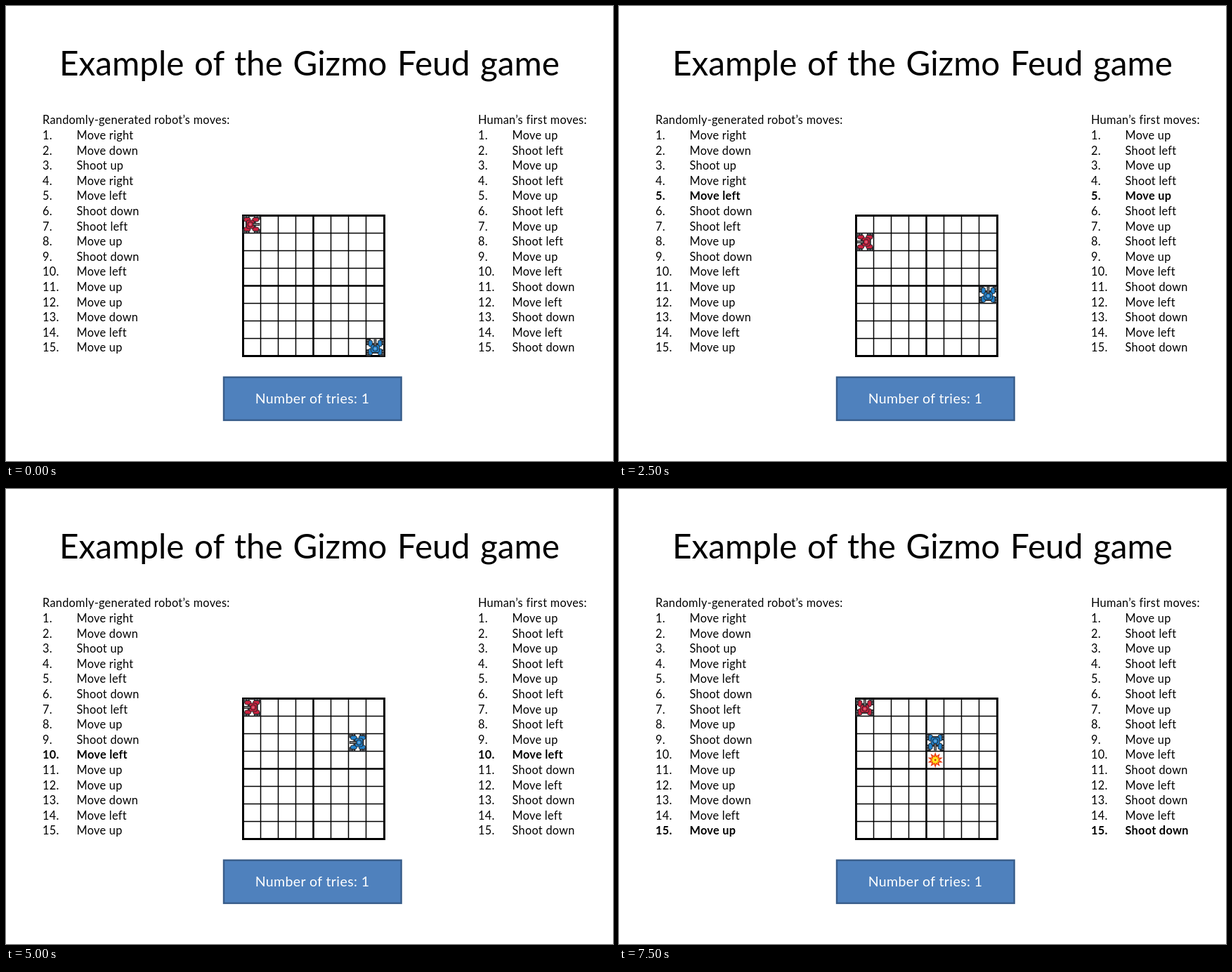
Recreate the animation shown at these times as an HTML page. Size 864x648 px, loop 8 s.

```html
<!DOCTYPE html>
<html lang="en">
<head>
<meta charset="utf-8">
<title>Robot game example</title>
<style>
  html, body { margin: 0; width: 100%; height: 100%; overflow: hidden; background: #fff; }
  svg { display: block; width: 864px; height: 648px; }
  text { font: 16.3px Lato, Carlito, sans-serif; letter-spacing: .3px; white-space: pre; }
  .title { font-size: 47.7px; letter-spacing: 0; word-spacing: 2.4px; text-anchor: middle; }
  .tries { font-size: 19.5px; letter-spacing: .4px; fill: #fff; text-anchor: middle; }
  .now { font-weight: 700; }
</style>
</head>
<body>
<svg id="stage" viewBox="0 0 864 648">
  <defs>
    <!-- Tank seen from above, facing up; body colour is inherited -->
    <g id="tank">
      <path d="M-6-6H6V9H-6Z" fill="#3a3a3e"/>
      <g fill="#2d2f33">
        <rect x="-12.5" y="-12" width="6" height="9"/>
        <rect x="6.5" y="-12" width="6" height="9"/>
        <rect x="-12.5" y="3" width="6" height="10"/>
        <rect x="6.5" y="3" width="6" height="10"/>
      </g>
      <path d="M-12-9.5h4M-12-6h4M-12 6h4M-12 9.5h4M8-9.5h4M8-6h4M8 6h4M8 9.5h4" stroke="#85888c"/>
      <g stroke="#222" stroke-width=".9">
        <rect x="-9.5" y="-10" width="5.5" height="9" rx="2.5"/>
        <rect x="4" y="-10" width="5.5" height="9" rx="2.5"/>
        <rect x="-9.5" y="2" width="5.5" height="9" rx="2"/>
        <rect x="4" y="2" width="5.5" height="9" rx="2"/>
        <rect x="-6" y="-3.5" width="12" height="11" rx="2.5"/>
        <rect x="-1.5" y="-11" width="3" height="9" fill="#777"/>
        <circle cy="2" r="3.8"/>
      </g>
      <circle cy="2" r="1.6" fill="#fff" fill-opacity=".35"/>
    </g>
  </defs>
  <text class="title" x="432" y="99">Example of the Gizmo Feud game</text>
  <rect x="310" y="528.7" width="252.6" height="61.2" fill="#4f81bd" stroke="#385d8a" stroke-width="2.4"/>
  <text class="tries" x="436" y="565.5">Number of tries: 1</text>
</svg>
<script>
const stage = document.getElementById('stage');
const DIRS = { up: [0, -1, 0], right: [1, 0, 90], down: [0, 1, 180], left: [-1, 0, 270] };
const LEFT = 337.25, TOP = 298.5, CELL_W = 25.1, CELL_H = 25;
const STEP = 500, STEPS = 16;

function add(tag, attrs, text = '') {
  const el = document.createElementNS('http://www.w3.org/2000/svg', tag);
  for (const key in attrs) el.setAttribute(key, attrs[key]);
  el.textContent = text;
  stage.append(el);
  return el;
}

const center = (col, row) => `translate(${LEFT + CELL_W * (col + .5)} ${TOP + CELL_H * (row + .5)})`;
const inside = (col, row) => col >= 0 && col < 8 && row >= 0 && row < 8;

// Grid lines sit on pixel centres.
const lineX = i => Math.floor(LEFT + i * CELL_W) + .5;
const lineY = i => Math.floor(TOP + i * CELL_H) + .5;
for (let i = 0; i <= 8; i++) {
  add('path', {
    d: `M${lineX(i)} ${lineY(0) - 1.5}V${lineY(8) + 1.5}M${lineX(0) - 1.5} ${lineY(i)}H${lineX(8) + 1.5}`,
    stroke: '#000',
    'stroke-width': i % 8 == 0 ? 3 : i == 4 ? 2.6 : 1.5
  });
}

function star(points, outer, inner) {
  return Array.from({ length: points * 2 }, (_, i) => {
    const r = i % 2 ? inner : outer, a = i * Math.PI / points;
    return [r * Math.sin(a), -r * Math.cos(a)].map(v => v.toFixed(1));
  }).join(' ');
}

// Replays the move list into one pose per step; `stuck` is a move that has no effect.
function play(moves, col, row, face, stuck) {
  const poses = [{ col, row, face }];
  moves.forEach((move, i) => {
    const [verb, dir] = move.split(' ');
    const [dx, dy] = DIRS[dir];
    const next = [col + dx, row + dy];
    let blast = null;
    if (inside(...next)) {
      if (verb == 'Shoot') blast = next;
      else if (i + 1 != stuck) [col, row] = next;
    }
    poses.push({ col, row, face: dir, blast });
  });
  return poses;
}

function player(x, heading, list, color, col, row, face, stuck) {
  const moves = list.split(',');
  const line = i => 168.4 + 21.6 * i;
  add('text', { x, y: line(0) }, heading);
  const rows = moves.map((move, i) => [
    add('text', { x, y: line(i + 1) }, `${i + 1}.`),
    add('text', { x: x + 48.5, y: line(i + 1) }, move)
  ]);
  const poses = play(moves, col, row, face, stuck);
  const tank = add('use', { href: '#tank', fill: color });
  const blast = [
    add('polygon', { points: star(10, 9, 5), fill: '#ffd91a', stroke: '#ee3a12', 'stroke-width': 1.5 }),
    add('circle', { r: 3.6, fill: '#ffee22' }),
    add('circle', { r: 1.4, fill: '#d63010' })
  ];
  return step => {
    rows.forEach((cells, i) => cells.forEach(cell => cell.classList.toggle('now', i + 1 == step)));
    const pose = poses[step];
    tank.setAttribute('transform', `${center(pose.col, pose.row)} rotate(${DIRS[pose.face][2]})`);
    for (const part of blast) {
      part.setAttribute('visibility', pose.blast ? 'visible' : 'hidden');
      if (pose.blast) part.setAttribute('transform', center(...pose.blast));
    }
  };
}

const players = [
  player(52, 'Randomly-generated robot’s moves:',
    'Move right,Move down,Shoot up,Move right,Move left,Shoot down,Shoot left,Move up,' +
    'Shoot down,Move left,Move up,Move up,Move down,Move left,Move up',
    '#cc2240', 0, 0, 'right', 4),
  player(672, 'Human’s first moves:',
    'Move up,Shoot left,'.repeat(4) + 'Move up' + ',Move left,Shoot down'.repeat(3),
    '#2382cc', 7, 7, 'up')
];

let shown = -1;
function frame(now) {
  const step = Math.floor(now / STEP) % STEPS;
  if (step != shown) players.forEach(show => show(step));
  shown = step;
  requestAnimationFrame(frame);
}
frame(0);
</script>
</body>
</html>
```
